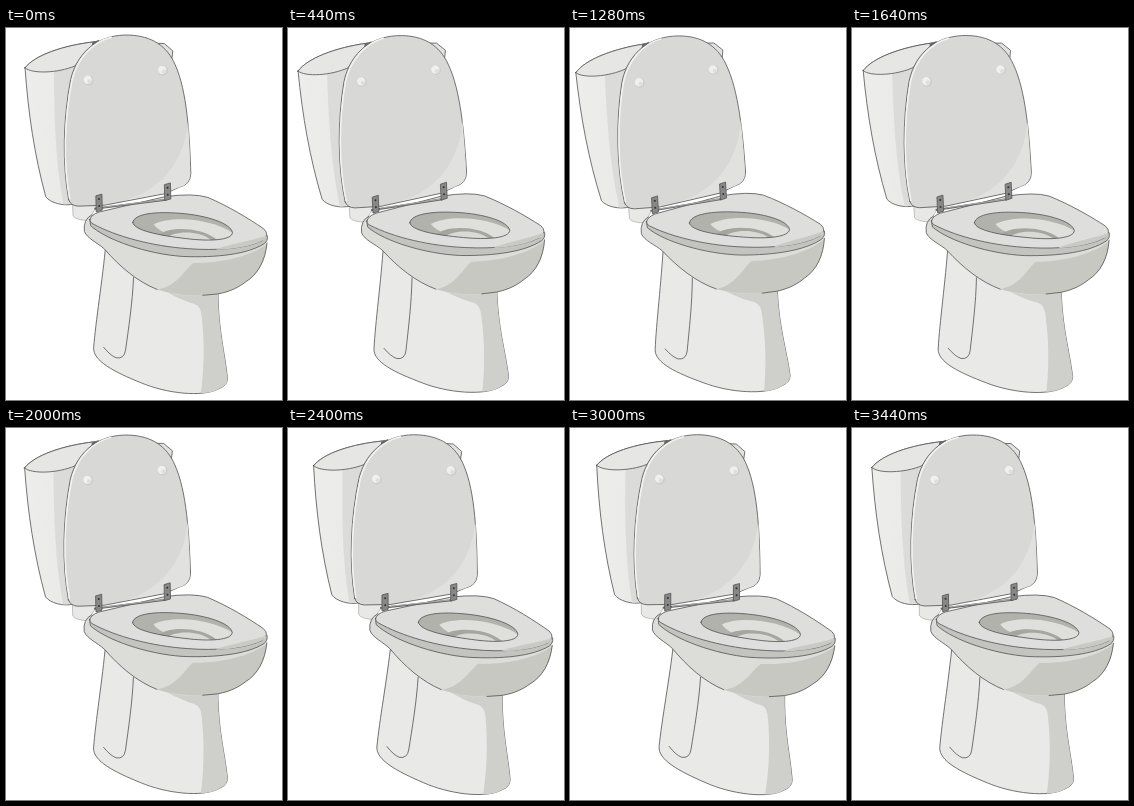
An HTML page that plays this animation: 276 px wide and 372 px high, repeating every 3480 ms.

```html
<!DOCTYPE html>
<html>
<head>
<meta charset="utf-8">
<style>
html, body { margin: 0; width: 100%; height: 100%; overflow: hidden; background: #fff; }
svg { display: block; }
.line, .edge { stroke: #555; stroke-width: .8; stroke-linecap: round; stroke-linejoin: round; }
.line { fill: none; }
</style>
</head>
<body>
<svg width="276" height="372" viewBox="0 0 276 372">
  <defs>
    <linearGradient id="tank"><stop offset="0" stop-color="#ededec"/><stop offset="1" stop-color="#e2e2e0"/></linearGradient>
    <g id="hinge">
      <path d="M0 1L6-1L7 15L1 17Z" fill="#888" stroke="#555" stroke-width=".8"/>
      <circle cx="3.3" cy="4" r="1" fill="#333"/><circle cx="3.8" cy="11" r="1" fill="#333"/>
    </g>
    <g id="bump">
      <circle r="5" fill="#cdcdcb"/><circle cx="-.8" cy="-.6" r="4.2" fill="#f0f0ef"/><circle cx="1" cy="1" r="2.2" fill="#dfdfdd"/>
    </g>
    <clipPath id="hole"><path id="rim" d="M119 195C120 186 142 183 166 184C193 185 217 192 219 201C219 209 196 211 173 209C146 207 120 203 119 195Z"/></clipPath>
  </defs>
  <g id="toilet">
    <!-- base -->
    <path class="edge" fill="#e9e9e8" d="M93 217C91 255 86 295 85 322C85 335 106 345 134 355C158 364 196 368 213 357Q220 354 220 347C216 320 209 300 207 262L150 225Z"/>
    <path fill="#cfcfcb" d="M104 229C125 246 158 268 184 274Q191 276 192 288C196 315 196 340 194 363Q207 362 213 357Q220 354 220 347C216 320 209 300 207 262Z"/>
    <path class="line" d="M122 250C122 275 119 302 117 323Q116 332 108 331Q102 329 95 321"/>
    <!-- neck -->
    <path class="edge" fill="#e8e8e7" stroke-opacity=".4" d="M58 178L59 191Q62 195 74 195L84 178Z"/>
    <!-- tank -->
    <path class="edge" fill="url(#tank)" d="M5 45C14 32 42 21 74 16L143 15L152 22L140 165L60 179C49 182 36 179 31 173C18 132 10 90 5 45Z"/>
    <path fill="#dbdbd9" d="M34 47L54 41L56 179L49 180C39 138 36 90 34 47Z"/>
    <path class="edge" fill="#e6e6e5" d="M5 45C14 32 42 21 74 16L55 41C38 49 12 51 5 45Z"/>
    <path d="M71 17L78 14L78 22L71 24Z" fill="#666"/>
    <!-- lid -->
    <path class="edge" fill="#d8d8d6" d="M54 175C46 140 45 95 51 55C57 24 80 8 108 8C130 8 146 17 155 36C168 62 172 105 175 144Q175 155 164 158L150 165L90 179L64 181Q56 181 54 175Z"/>
    <path fill="#e1e1df" d="M170 92C173 120 174 135 174.5 145Q174 155 164 158L150 164L108 174C142 164 168 136 170 92Z"/>
    <path class="line" style="stroke:#f4f4f3;stroke-width:1.5" d="M55 174C47 140 46 95 52.5 55C57 33 72 16 90 11"/>
    <use href="#bump" x="69" y="55"/>
    <use href="#bump" x="143" y="42"/>
    <!-- bowl -->
    <path fill="#dcdcd9" d="M78 189Q69 194 71 206C74 213 85 217 92 223C108 240 126 254 146 261Q170 268 192 265L207 263C220 260 228 255 234 250C246 242 253 228 254 210L160 195Z"/>
    <path fill="#c8c8c3" d="M146 261C166 257 172 241 181 233C210 232 238 224 254 211C253 229 246 242 234 250Q222 260 207 263L192 265Q168 267 146 261Z"/>
    <path class="line" d="M78 189Q69 194 71 206C74 213 85 217 92 223C108 240 126 254 146 261M192 265L207 263C220 260 228 255 234 250C246 242 253 228 254 210"/>
    <!-- seat -->
    <path class="edge" fill="#c3c3bf" d="M76 194L77 200C94 214 135 226 170 227C205 227 235 222 251 211Q255 208 254 203Z"/>
    <path class="edge" fill="#dededc" d="M76 194Q77 189 85 186L150 168Q178 163 193 167C214 175 234 186 250 196Q257 202 249 208C232 217 203 220 175 219C140 218 103 210 79 198Q76 197 76 194Z"/>
    <path fill="#c9c9c5" d="M203 219C212 214 230 211 253 203Q254 206 249 208C238 214 220 218 203 219Z"/>
    <use href="#rim" fill="#b2b2ad"/>
    <g clip-path="url(#hole)">
      <path fill="#dfdfdc" d="M140 196C158 186 200 188 222 203L218 214H180C160 208 145 203 140 196Z"/>
      <path fill="#a6a6a1" d="M146 207C150 198 190 195 206 211Z"/>
      <path fill="#d9d9d6" d="M153 210C160 201 188 200 200 211Z"/>
    </g>
    <use href="#rim" class="line"/>
    <!-- hinges -->
    <path d="M80 183L151 171" stroke="#666" stroke-width="2"/>
    <path d="M89 181L149 171" stroke="#bbb" stroke-width=".8"/>
    <use href="#hinge" x="81" y="169"/>
    <use href="#hinge" x="149" y="155"/>
  </g>
</svg>
<script>
const LOOP = 3480, STEP = 40, SWING = 1.95;
const toilet = document.getElementById('toilet');
const sway = t => -SWING * Math.sin(2 * Math.PI * (t - 140) / LOOP);
const drawnPose = sway(840);

function draw(now) {
  const t = Math.floor(now % LOOP / STEP) * STEP;
  toilet.setAttribute('transform', `rotate(${sway(t) - drawnPose} 138 385)`);
  requestAnimationFrame(draw);
}
draw(performance.now());
</script>
</body>
</html>
```
